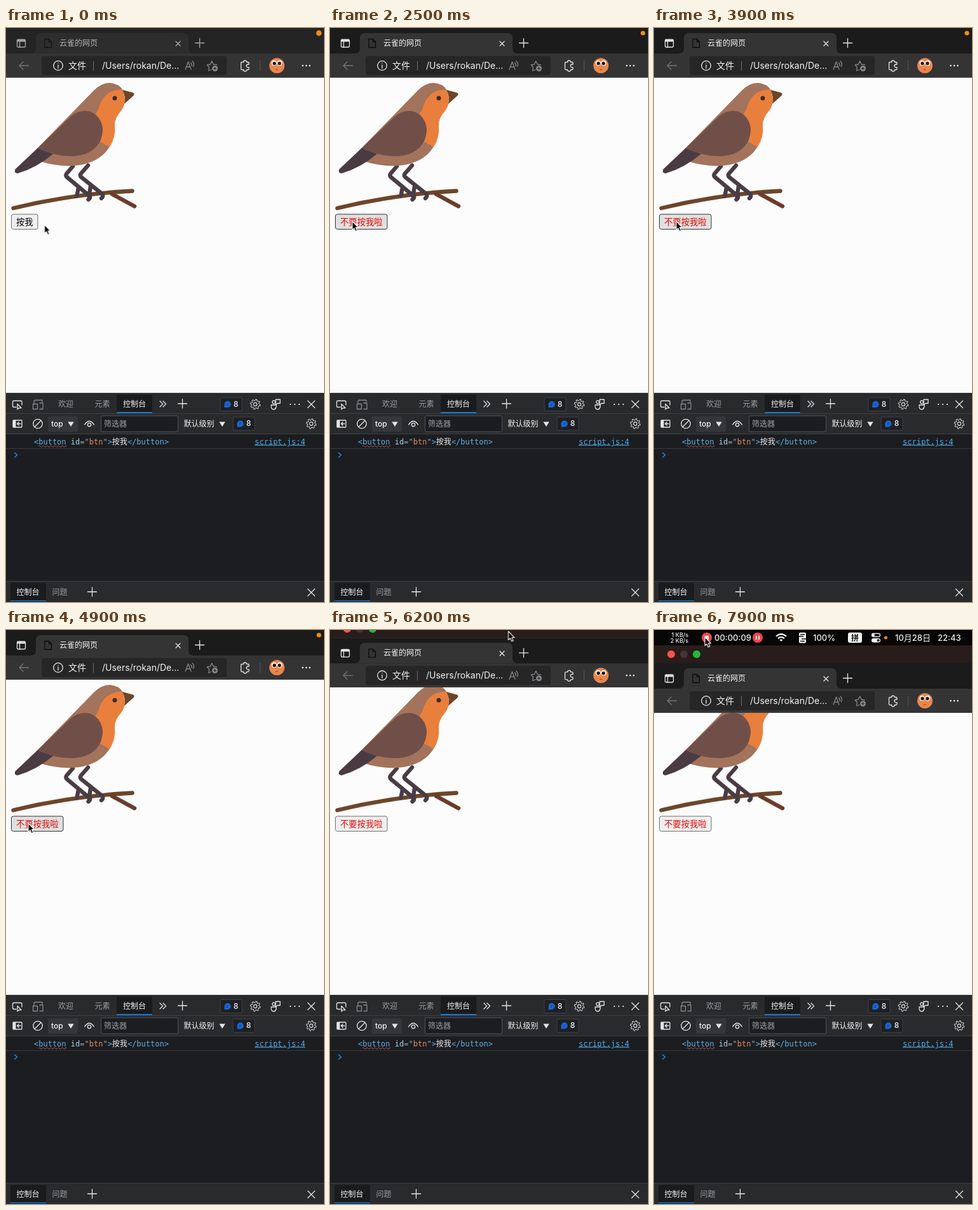
These frames come from a looping animation (500x900 px, 8 s). An HTML page:

```html
<!DOCTYPE html>
<html lang="zh">
<head>
<meta charset="utf-8">
<title>云雀的网页</title>
<style>
html, body { margin: 0; width: 100%; height: 100%; overflow: hidden; background: #fcfcfc; }
svg { display: block; width: 500px; height: 900px; }
text { font: 12px Inter, "Noto Sans CJK SC", "Noto Sans CJK", sans-serif; fill: #f2f2f2; white-space: pre; }
.mono { font: 12px "DejaVu Sans Mono", "Noto Sans CJK SC", "Noto Sans CJK", monospace; }
.dim { fill: #9b9ea2; }
.mid { font-weight: 500; }
.label { font-size: 13.33px; font-weight: 500; }
.s13 { font-size: 13px; }
.s14 { font-size: 14px; }
.line { fill: none; stroke: #e4e6e8; stroke-width: 1.3; stroke-linecap: round; stroke-linejoin: round; }
.faint { stroke: #85888b; }
.teeth { stroke-width: 1.1; stroke-linecap: butt; }
.leg { fill: none; stroke: #4a3c45; stroke-width: 6.4; stroke-linecap: round; stroke-linejoin: round; }
.twig { fill: none; stroke-width: 6.4; stroke-linecap: round; }

#top, #cursor, .idle, .hover, .before, .after, .old, .new, #rec, #strip, #tab {
  animation: 8s step-end infinite;
}
#top { animation-name: slide; }
@keyframes slide {
  0% { transform: none; }
  76.25% { transform: none; animation-timing-function: ease-in-out; }
  80%, 100% { transform: translateY(52px); }
}
#cursor { animation-name: move; }
@keyframes move {
  0% { transform: translate(60.5px, 308.5px); }
  2.5% { transform: translate(60.5px, 308.5px); animation-timing-function: ease-in-out; }
  8.75% { transform: translate(35px, 303px); }
  66.5% { transform: translate(35px, 303px); animation-timing-function: ease-in-out; }
  74%  { transform: translate(280px, 0); }
  76.25% { transform: translate(280px, 0); animation-timing-function: ease-out; }
  80% { transform: translate(281px, 4px); }
  83.75% { transform: translate(281px, 4px); animation-timing-function: ease-in-out; }
  94%, 100% { transform: translate(80px, 11px); }
}
#strip { animation-name: strip; }
@keyframes strip { 0% { fill: #242424; } 11.25%, 100% { fill: #1b1b1b; } }
#tab { animation-name: tab; }
@keyframes tab { 0% { fill: #2d2d2e; } 11.25%, 100% { fill: #343435; } }
.idle { animation-name: idle; }
@keyframes idle { 0% { opacity: .68; } 11.25%, 100% { opacity: 1; } }
.hover { animation-name: hover; }
@keyframes hover { 0% { fill: #efefef; stroke: #6f6f6f; } 6.25% { fill: #e0e0e0; stroke: #333; } 68.75%, 100% { fill: #efefef; stroke: #6f6f6f; } }
.before { animation-name: before; }
@keyframes before { 0% { opacity: 1; } 26.25%, 100% { opacity: 0; } }
.after { animation-name: after; }
@keyframes after { 0% { opacity: 0; } 26.25%, 100% { opacity: 1; } }
.old { animation-name: old; }
@keyframes old { 0% { opacity: 1; } 90%, 100% { opacity: 0; } }
.new { animation-name: new; }
@keyframes new { 0% { opacity: 0; } 90%, 100% { opacity: 1; } }
#rec { animation-name: rec; }
@keyframes rec { 0% { opacity: 1; r: 4.4px; } 11.25% { opacity: 1; r: 3.6px; } 77.5%, 100% { opacity: 0; r: 3.6px; } }
</style>
</head>
<body>
<svg viewBox="0 0 500 900">
  <defs>
    <g id="gear" class="line">
      <circle r="2.6" stroke-width="1.1"/>
      <circle class="teeth" r="7.6" pathLength="16" stroke-dasharray="1.1 .9"/>
      <circle class="teeth" r="6" pathLength="16" stroke-dasharray="1.2 .8" stroke-dashoffset="1.1"/>
    </g>
    <path id="plus" class="line" d="M-7 0H7M0-7V7"/>
    <path id="close" class="line" d="M-5.5-5.5 5.5 5.5M5.5-5.5-5.5 5.5"/>
    <path id="down" fill="#e4e6e8" d="M-4.7-3.5H4.7L0 4Z"/>
    <g id="badge">
      <rect x=".5" y=".5" width="34" height="21" rx="2" fill="#1e2023" stroke="#414347"/>
      <path d="M7 16V11a5 5 0 1 1 5 5Z" fill="#1968d8"/>
      <path d="M10 10h4M10 12.5h3" stroke="#123f86"/>
      <text class="mid" x="21.3" y="14.5">8</text>
    </g>
  </defs>

  <rect width="500" height="900" fill="#fcfcfc"/>

  <g id="bird">
    <path class="twig" stroke="#6d4629" d="M11.5 282.5Q105 260 198.500 255.500"/>
    <path class="twig" stroke="#6c3b2c" d="M167 260.500 202 279.500"/>
    <path class="leg" d="M105 217 95.500 228Q93 231 96 234L131 263Q134 266 129.500 269M114 250 111.500 263"/>
    <path class="leg" d="M129 215.500 118 228Q115.500 231 118.500 234L151 260Q154 264 150 267M133 248 130.500 264"/>
    <path fill="#a4735b" d="M48 190 138 98Q150 86 163 86 178 87 184 98L160 140 163 186C143 219 96 222 53 209L70 194Z"/>
    <path fill="#e97f3c" d="M183.500 97Q186 104 187 112 187 123 180 131 171 141 171 152 173 171 163 186.500L146 177 135 140Q143 134 146 125C151 107 165 95 183.500 97Z"/>
    <path fill="#6d4528" d="M183 97 200 101.500Q203 103.500 200 106.500L186 119Q189 109 183 97Z"/>
    <circle cx="171" cy="110" r="3.500" fill="#3c2c2c"/>
    <path fill="#4a3b43" d="M50 188 74 197.500Q47 220 18 228 12 227 14.500 221.500Z"/>
    <path fill="#714f49" d="M49.500 188.500 102 138.500Q112 130 124 130C142 130 152 146 152 160 151 187 130 200 105 201 85 201 68 197 49.500 188.500Z"/>
  </g>

  <g class="before">
    <rect class="hover" x="8.500" y="292" width="41.500" height="23.500" rx="3"/>
    <text class="label" x="16" y="308.500" style="fill:#000">按我</text>
  </g>
  <g class="after">
    <rect class="hover" x="8.500" y="292" width="81.500" height="23.500" rx="3"/>
    <text class="label" x="16" y="308.500" style="fill:#e20a0a">不要按我啦</text>
  </g>

  <g id="tools">
    <rect y="572" width="500" height="328" fill="#1b1d20"/>
    <rect y="572" width="500" height="64" fill="#292a2c"/>
    <path d="M0 572.500H500M0 604.500H500M0 636.500H500M0 867.500H500" stroke="#3d3f42"/>
    <rect x="174" y="575" width="56" height="29" fill="#1a1b1d"/>
    <rect x="174" y="602" width="56" height="2" fill="#1377d6"/>

    <path class="line" d="M16 594.500H12.500a2 2 0 0 1-2-2V586.500a2 2 0 0 1 2-2H23a2 2 0 0 1 2 2V591M18 589.500V598L20.300 595.800H24Z"/>
    <path class="line faint" d="M44 588V585.500a2 2 0 0 1 2-2H57V586M42.500 589.500H49.500V597.500H42.500ZM53 588H58V597.500H53"/>
    <text class="dim" x="82" y="594">欢迎</text>
    <text class="dim" x="139.500" y="594">元素</text>
    <text class="mid" x="184" y="594">控制台</text>
    <path class="line" d="M242 585 246.500 589.500 242 594M247 585 251.500 589.500 247 594"/>
    <use href="#plus" x="277.500" y="589"/>
    <use href="#badge" x="336.500" y="579"/>
    <use href="#gear" x="392" y="590"/>
    <path class="line" d="M424 582.500H431V588.500H427L424 591ZM417 591H425V593Q424 598 421 598 417 598 417 593Z"/>
    <circle class="line" cx="421" cy="586.500" r="2.300"/>
    <path d="M447 590h.1M454 590h.1M461 590h.1" stroke="#e4e6e8" stroke-width="2.200" stroke-linecap="round"/>
    <use href="#close" x="480" y="590"/>

    <rect class="line" x="11" y="615" width="14" height="11" rx="1"/>
    <path d="M11 615h4.500v11H11Z" fill="#e4e6e8"/>
    <path d="M17.500 620.500H23M20 618 17.500 620.500 20 623" class="line"/>
    <g class="line"><circle cx="50" cy="620.500" r="7.200"/><path d="M45 625.500 55 615.500"/></g>
    <rect x="66" y="609" width="47" height="24" rx="2" fill="#343639"/>
    <text class="mid" x="71" y="625">top</text>
    <use href="#down" x="102" y="621"/>
    <path class="line" d="M123.500 622Q131 611 138.500 622"/>
    <circle class="line" cx="131" cy="622" r="2.700"/>
    <rect x="149.500" y="608" width="121" height="25" rx="2" fill="#1b1d20" stroke="#505357"/>
    <text class="dim" x="154" y="625">筛选器</text>
    <text class="mid" x="279.500" y="625">默认级别</text>
    <use href="#down" x="340" y="621"/>
    <use href="#badge" x="356.500" y="609.500"/>
    <use href="#gear" x="480" y="620.500"/>

    <text class="mono" x="44" y="653" style="fill:#62afe3">&lt;button <tspan fill="#a8cfe9">id</tspan><tspan fill="#9aa2a8">="</tspan><tspan fill="#e08b63">btn</tspan><tspan fill="#9aa2a8">"</tspan>&gt;<tspan fill="#e6e8ea">按我</tspan>&lt;/button&gt;</text>
    <path d="M51 656q1.500-3 3 0t3 0 3 0 3 0 3 0 3 0 3 0 3 0 3 0 3 0 3 0 3 0 3 0 3 0 2 0" fill="none" stroke="#b5575c"/>
    <text class="mono" x="391" y="652.500" style="fill:#52a9e8;text-decoration:underline">script.js:4</text>
    <path d="M0 659.500H500" stroke="#36383b"/>
    <path d="M13 665.500 17.500 669.500 13 673.500" fill="none" stroke="#2385dc" stroke-width="1.500"/>

    <rect y="868" width="500" height="32" fill="#292a2c"/>
    <rect x="7" y="870" width="56" height="30" fill="#1a1b1d"/>
    <rect x="7" y="897.500" width="56" height="1.500" fill="#1377d6"/>
    <text class="mid" x="16.500" y="889">控制台</text>
    <text class="dim" x="72.500" y="889">问题</text>
    <use href="#plus" x="135.500" y="884"/>
    <use href="#close" x="480" y="885"/>
  </g>

  <g id="top">
    <g transform="translate(0 -52)">
      <rect width="500" height="24" fill="#070506"/>
      <rect y="24" width="500" height="28.500" fill="#281d1b"/>
      <circle cx="27" cy="38" r="6" fill="#f4544d"/>
      <circle cx="47" cy="38" r="6" fill="#453435"/>
      <circle cx="67" cy="38" r="6" fill="#26b63d"/>
      <g class="old" text-anchor="end">
        <text class="mid" x="54" y="11" style="font-size:9px">2 KB/s</text>
        <text class="mid" x="54" y="20" style="font-size:9px">7 KB/s</text>
        <text class="mid s13" x="95" y="16.500" text-anchor="start">00:00:08</text>
      </g>
      <g class="new" text-anchor="end">
        <text class="mid" x="54" y="11" style="font-size:9px">1 KB/s</text>
        <text class="mid" x="54" y="20" style="font-size:9px">2 KB/s</text>
        <text class="mid s13" x="95" y="16.500" text-anchor="start">00:00:09</text>
      </g>
      <circle cx="83" cy="12" r="8" fill="#f3464b"/>
      <rect x="80" y="9" width="6" height="6" rx="1" fill="#fff"/>
      <circle cx="163" cy="12" r="8" fill="#f3464b"/>
      <path d="M161 9V15M165 9V15" stroke="#fff" stroke-width="1.700"/>
      <g fill="none" stroke="#f4f4f4" stroke-width="2.200">
        <path d="M192 10Q200 3 208 10M195 13.300Q200 9 205 13.300"/>
        <path d="M197.500 15.500Q200 13.500 202.500 15.500L200 18Z" fill="#f4f4f4" stroke="none"/>
      </g>
      <rect x="228" y="4" width="11" height="16.500" rx="2" fill="#f4f4f4"/>
      <path d="M227 10H235M232 14H240M230 7H237M230 17.500H237" stroke="#111" stroke-width="1.300"/>
      <text class="mid s13" x="250" y="16.500">100%</text>
      <rect x="305" y="4" width="22" height="16" rx="3" fill="#f4f4f4"/>
      <text x="310" y="16.500" style="fill:#111;font-weight:700">拼</text>
      <rect class="line" x="342.500" y="5.500" width="13" height="5" rx="2.500"/>
      <circle cx="345" cy="8" r="2" fill="#fff"/>
      <rect x="342" y="13" width="14" height="6.500" rx="3.200" fill="#f4f4f4"/>
      <circle cx="352.700" cy="16.200" r="2" fill="#111"/>
      <circle cx="364.500" cy="12" r="2.500" fill="#f68b14"/>
      <text class="mid s13" x="379" y="16.500">10月28日</text>
      <text class="mid s13" x="446" y="16.500">22:43</text>
    </g>

    <rect id="strip" width="500" height="41"/>
    <path id="tab" d="M39 40Q47 40 47 32V16Q47 8 55 8H279Q287 8 287 16V32Q287 40 295 40Z"/>
    <rect y="40" width="500" height="38" fill="#343435"/>
    <path d="M0 77.500H500" stroke="#434344"/>
    <g class="idle">
      <rect class="line" x="17.500" y="18" width="13" height="12" rx="2"/>
      <path d="M18 18.500H30V21.500H18Z" fill="#e4e6e8"/>
      <path class="line" d="M21.500 21V30"/>
      <path d="M61 17.500H67.500L71.500 21.500V30.500H61ZM67.500 17.500V21.500H71.500" fill="none" stroke="#0b0b0b" stroke-width="1.300"/>
      <text class="mid" x="84" y="28">云雀的网页</text>
      <path class="line" d="M267 21 274 28M274 21 267 28"/>
      <use href="#plus" x="304.500" y="23.500"/>
    </g>
    <path class="line" style="stroke:#737475" d="M35.500 59H21M27 53 21 59 27 65"/>
    <rect x="56" y="44" width="291" height="30" rx="4" fill="#262627"/>
    <g class="line"><circle cx="82" cy="59" r="7.300"/><path d="M82 58V63M82 55.200v.1"/></g>
    <text class="mid s14" x="98" y="64">文件</text>
    <path d="M137.500 52V67" stroke="#6b6c6e"/>
    <text class="s14" x="151" y="64">/Users/rokan/De...</text>
    <path class="line faint" d="M282 65 286.500 53 291 65M283.500 61H289.500M290.500 54.500Q293 56.500 292 59.500M293 52Q297 56 294.500 60.500"/>
    <path class="line faint" d="M323 65.500 318.500 67 319.500 61.500 316 57.800 321.300 57 323.700 52 326.200 57 331.500 57.800"/>
    <circle cx="328.500" cy="63.500" r="4.500" fill="#85888b"/>
    <path d="M326 63.500H331M328.500 61V66" stroke="#262627"/>
    <path class="line" d="M371 53.500H373.500A2.500 2.500 0 0 1 378.500 53.500H380.500Q382 53.500 382 55V57H380.500A2.400 2.400 0 0 0 380.500 61.800H382V64Q382 65.500 380.500 65.500H378.500A2.500 2.500 0 0 1 373.500 65.500H371Q369.500 65.500 369.500 64V55Q369.500 53.500 371 53.500Z"/>
    <path d="M399.500 51V67" stroke="#555658"/>
    <circle cx="426" cy="59" r="12" fill="#e9864a"/>
    <circle cx="421.700" cy="55" r="4.200" fill="#fff"/>
    <circle cx="430.300" cy="55" r="4.200" fill="#fff"/>
    <circle cx="422" cy="55.500" r="2.700" fill="#24140f"/>
    <circle cx="430" cy="55.500" r="2.700" fill="#24140f"/>
    <path d="M424 65.500Q426 64 428 65.500" fill="none" stroke="#8a3f20"/>
    <path d="M466.500 59h.1M472 59h.1M477.500 59h.1" stroke="#f2f2f2" stroke-width="2.500" stroke-linecap="round"/>
  </g>

  <circle id="rec" cx="492" cy="8" r="3.600" fill="#f68b14"/>
  <path id="cursor" d="M0 0V13.500L3 10.800 5.200 15.800 7.700 14.700 5.500 9.800H9.500Z" fill="#050505" stroke="#fff" stroke-width="1.100" stroke-linejoin="round"/>
</svg>
</body>
</html>
```
